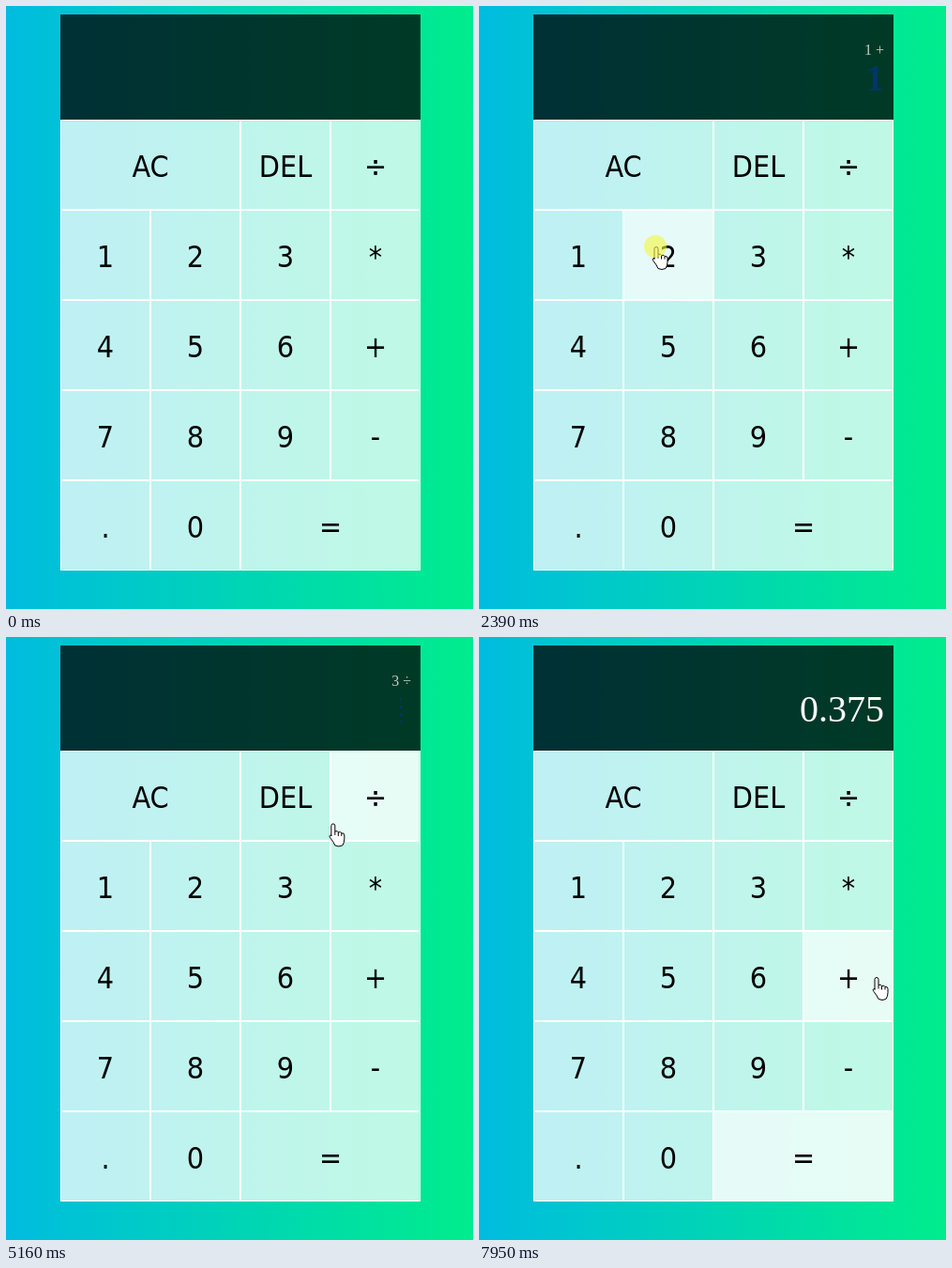
An HTML page that plays this animation: 498 px wide and 642 px high, repeating every 8 s.

```html
<!DOCTYPE html>
<html lang="en">
<head>
<meta charset="utf-8">
<title>Calculator</title>
<style>
  html, body { margin: 0; width: 100%; height: 100%; overflow: hidden; }
  svg { display: block; width: 498px; height: 642px; }
  .label {
    font: 32px "DejaVu Sans Condensed", "DejaVu Sans", sans-serif;
    font-stretch: condensed;
    text-anchor: middle;
  }
  .key { fill: #fff; fill-opacity: .75; }
  .key.lit { fill-opacity: .9; }
  .display { font-family: "Liberation Serif", "Times New Roman", serif; text-anchor: end; fill: #fff; }
  #previous { font-size: 16px; fill-opacity: .75; }
  #current { font-size: 40px; }
  #current.faded { fill: #003764; font-weight: bold; }
</style>
</head>
<body>
<svg viewBox="0 0 498 642">
  <defs>
    <linearGradient id="sky" gradientUnits="userSpaceOnUse" x1="-190" x2="690" y1="0" y2="0">
      <stop stop-color="#0af"/>
      <stop offset="1" stop-color="#00ff6c"/>
    </linearGradient>
  </defs>
  <rect width="498" height="642" fill="url(#sky)"/>
  <rect x="58" y="9" width="384" height="112" fill-opacity=".75"/>
  <g class="display">
    <text id="previous" x="432"></text>
    <text id="current" x="432"></text>
  </g>
  <path id="dashes" d="M421 65V91" stroke="#003764" stroke-width="2" stroke-dasharray="3 5"/>
  <g id="keys"></g>
  <g id="cursor">
    <g transform="translate(1 .5)" fill="none" stroke="#000" stroke-linejoin="round">
      <path fill="#fff" d="M-2 13V2a2 2 0 0 1 4 0V8q3-1 3.500 1 3-1 3.500 1 3-.5 3 2v4q0 4-2 7-4 2-8 0-1-3-5-8-2-3 1-3z"/>
      <path d="M2 8v4M5.500 9v4M9 10v3"/>
    </g>
    <circle id="press" r="12" fill="#f5f53a" fill-opacity=".6"/>
  </g>
</svg>
<script>
  const LOOP = 8000, ENTER = 200, PRESS = 180, HOVER_DELAY = 40, CELL = 96;
  const $ = id => document.getElementById(id);

  function add(parent, tag, attributes) {
    const node = document.createElementNS('http://www.w3.org/2000/svg', tag);
    for (const name in attributes) node.setAttribute(name, attributes[name]);
    return parent.appendChild(node);
  }

  function makeKey(label, x, y, width) {
    const face = add($('keys'), 'rect', { class: 'key', x, y, width, height: CELL });
    add($('keys'), 'rect', {
      x: x + .5, y: y + .5, width: width - 1, height: CELL - 1, fill: 'none', stroke: '#fff'
    });
    add($('keys'), 'text', { class: 'label', x: x + width / 2, y: y + 61 }).textContent = label;
    const contains = p => p.x >= x && p.x < x + width && p.y >= y && p.y < y + CELL;
    return { label, face, contains };
  }

  // One word per key, row by row; wide keys fill two columns.
  const keys = [];
  let slot = 0;
  for (const label of 'AC DEL ÷ 1 2 3 * 4 5 6 + 7 8 9 - . 0 ='.split(' ')) {
    const span = label === 'AC' || label === '=' ? 2 : 1;
    keys.push(makeKey(label, 58 + slot % 4 * CELL, 121 + (slot >> 2) * CELL, span * CELL));
    slot += span;
  }
  const keyAt = point => keys.find(key => key.contains(point));

  const route = [
    { x: 110, y: 265, depart: ENTER, arrive: 760, press: 1030 },
    { x: 355, y: 330, depart: 1130, arrive: 1490 },
    { x: 366, y: 350, depart: 1520, arrive: 1640, press: 1680 },
    { x: 188, y: 256, depart: 1880, arrive: 2240, press: 2385 },
    { x: 343, y: 553, depart: 2570, arrive: 3260, press: 3530 },
    { x: 381, y: 174, depart: 3707, arrive: 4280, press: 4405 },
    { x: 208, y: 465, depart: 4840, arrive: 5985, press: 6120 },
    { x: 432, y: 590, depart: 6300, arrive: 6448 },
    { x: 390, y: 582, depart: 6670, arrive: 6740, press: 6800 },
    { x: 423, y: 362, depart: 7530, arrive: 7950 }
  ];

  // Sideways motion leads, vertical motion follows.
  function pointerAt(time) {
    let point = { x: 420, y: 585 };
    for (const { x, y, depart, arrive } of route) {
      if (time <= depart) break;
      const u = Math.min(1, (time - depart) / (arrive - depart));
      const k = u * u * (3 - 2 * u);
      point = { x: point.x + (x - point.x) * k, y: point.y + (y - point.y) * k ** 1.5 };
    }
    return point;
  }

  const operations = {
    '+': (a, b) => a + b, '-': (a, b) => a - b, '*': (a, b) => a * b, '÷': (a, b) => a / b
  };

  function enter({ current, previous }, label) {
    if (label in operations) return { previous: `${current} ${label}`, current: '', operand: current };
    if (label !== '=') return { previous, current: current + label };
    const [operand, operator] = previous.split(' ');
    return { previous: '', current: String(operations[operator](+operand, +current)) };
  }

  const presses = route.filter(stop => stop.press)
    .map(stop => ({ time: stop.press, key: keyAt(stop) }));

  function draw(time) {
    const visible = time >= ENTER;
    const pointer = pointerAt(time);
    const hovered = keyAt(pointer);
    const settled = visible && hovered === keyAt(pointerAt(time - HOVER_DELAY));
    const pressed = presses.filter(press => press.time <= time).pop();
    const { previous, current, operand } = presses
      .filter(press => press.time + PRESS <= time)
      .reduce((state, press) => enter(state, press.key.label), { previous: '', current: '' });

    $('cursor').setAttribute('transform', `translate(${pointer.x} ${pointer.y})`);
    $('cursor').style.display = visible ? '' : 'none';
    $('press').style.display = pressed && time < pressed.time + PRESS ? '' : 'none';

    for (const key of keys) {
      const focused = pressed && pressed.key === key;
      key.face.classList.toggle('lit', Boolean(focused || settled && key === hovered));
    }

    // A cleared operand leaves a dim trace.
    const faded = Boolean(operand) && previous.endsWith('+');
    $('previous').textContent = previous;
    $('previous').setAttribute('y', current ? 40 : 52);
    $('current').textContent = faded ? operand : current;
    $('current').setAttribute('y', previous && current ? 94 : 90);
    $('current').classList.toggle('faded', faded);
    $('dashes').style.display = operand && !faded ? '' : 'none';
  }

  const start = performance.now();
  function tick() {
    draw((performance.now() - start) % LOOP);
    requestAnimationFrame(tick);
  }
  tick();
</script>
</body>
</html>
```
